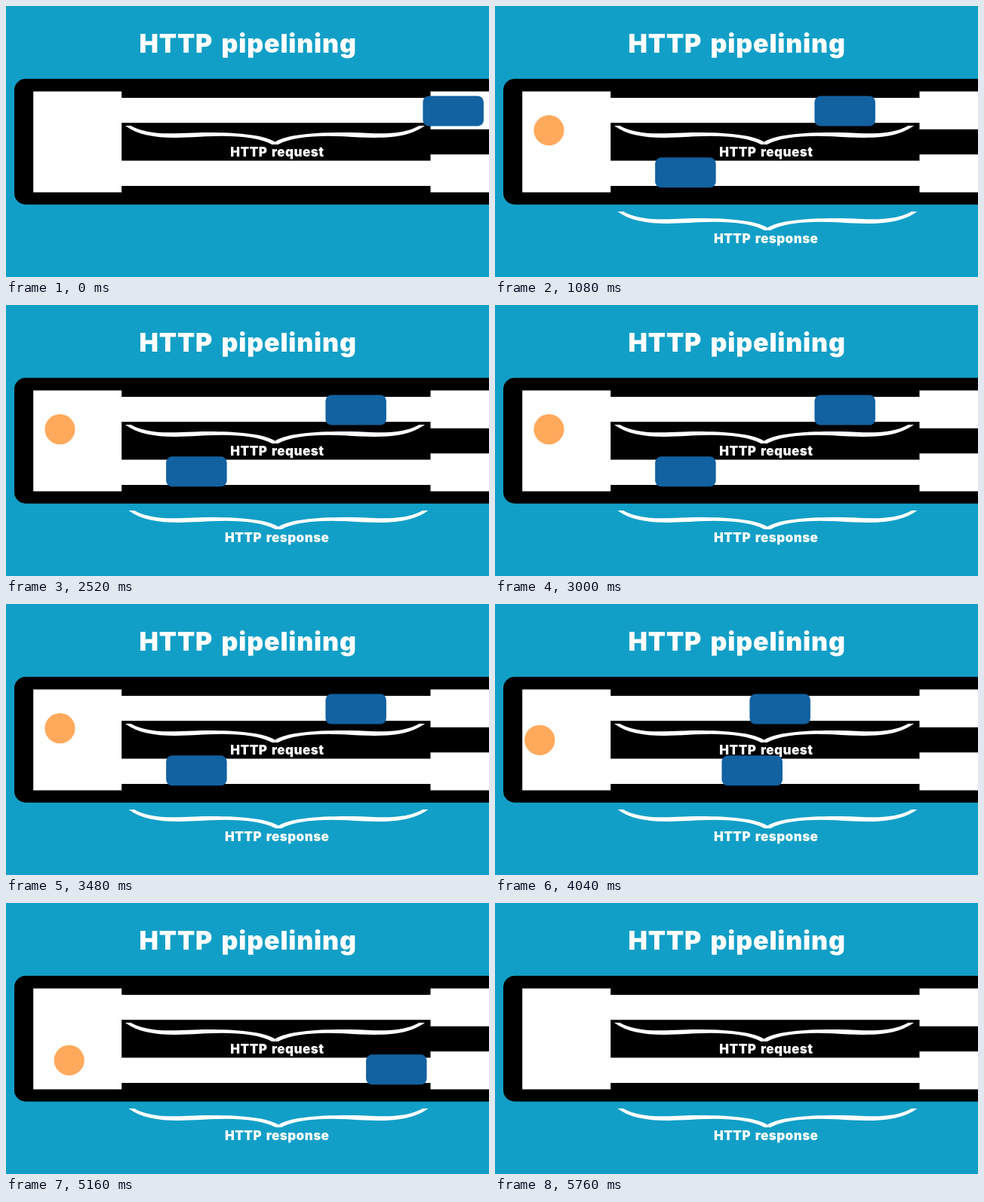
An HTML page for the animation above (7.68 s loop, 640 by 360 pixels).

```html
<!DOCTYPE html>
<html lang="en">
<head>
<meta charset="utf-8">
<title>HTTP pipelining</title>
<style>
  html, body { margin: 0; width: 100%; height: 100%; overflow: hidden; background: #129fc7; }
  svg { display: block; width: 100%; height: 100%; }
  text {
    font: 900 17px Inter, sans-serif;
    font-optical-sizing: none;
    letter-spacing: .026em;
    word-spacing: .11em;
    text-anchor: middle;
    fill: #fff;
  }
  .title { font-size: 33.9px; }
  .packet { fill: #1261a0; }
</style>
</head>
<body>
<svg viewBox="0 0 640 360">
  <defs>
    <path id="half" d="M158 159H165.5C177 166 198 170.3 225 169.2C272 166.8 335 167 356.5 180.5V184H352.5C335 174.5 305 171.5 265 173.3C215 176.5 182 176.5 158 159Z"/>
    <g id="brace" fill="#fff">
      <use href="#half"/>
      <use href="#half" transform="matrix(-1 0 0 1 713 0)"/>
    </g>
  </defs>

  <rect width="640" height="360" fill="#129fc7"/>
  <text class="title" x="320.6" y="62">HTTP pipelining</text>

  <rect x="11" y="96.8" width="660" height="166.9" rx="15"/>
  <g fill="#fff">
    <rect x="36.2" y="113.5" width="117" height="134"/>
    <rect x="153" y="122" width="410" height="33.2"/>
    <rect x="153" y="205.5" width="410" height="33.5"/>
    <rect x="562.5" y="113.5" width="90" height="50.3"/>
    <rect x="562.5" y="197.2" width="90" height="50.3"/>
  </g>

  <use href="#brace"/>
  <text x="359.4" y="200">HTTP request</text>
  <g id="responseLabel">
    <use href="#brace" x="4.5" y="114"/>
    <text x="359.2" y="314.5">HTTP response</text>
  </g>

  <rect id="request" class="packet" y="119.5" width="80.5" height="40" rx="8"/>
  <rect id="response" class="packet" y="201.3" width="80.5" height="40" rx="8"/>
  <circle id="work" r="20.1" fill="#ffa95c"/>
</svg>
<script>
  const STEP_MS = 40, LOOP_STEPS = 192;
  const TRIP = 12;              // steps one packet needs for each stage
  const ACTIVE = 10 * TRIP;     // ten packets pass through every stage

  const [request, response, work, responseLabel] =
    ['request', 'response', 'work', 'responseLabel'].map(id => document.getElementById(id));

  const show = (el, visible) => el.setAttribute('visibility', visible ? 'visible' : 'hidden');
  const quadratic = (a, b, c, t) => (1 - t) ** 2 * a + 2 * t * (1 - t) * b + t * t * c;

  function draw(now) {
    const step = Math.floor(now / STEP_MS) % LOOP_STEPS;
    const phase = step % TRIP;
    const t = phase / (TRIP - 1);
    const isActive = start => step >= start && step < start + ACTIVE;

    show(request, isActive(0));
    show(work, isActive(TRIP));
    show(response, isActive(2 * TRIP));
    show(responseLabel, step >= 2 * TRIP);

    request.setAttribute('x', 552.4 - 43 * phase);
    response.setAttribute('x', 79.7 + 44.15 * phase);
    work.setAttribute('cx', quadratic(120.3, -2.8, 120.3, t));
    work.setAttribute('cy', quadratic(139.5, 188.7, 221.3, t));
  }

  function tick() {
    draw(performance.now());
    requestAnimationFrame(tick);
  }
  tick();
</script>
</body>
</html>
```
